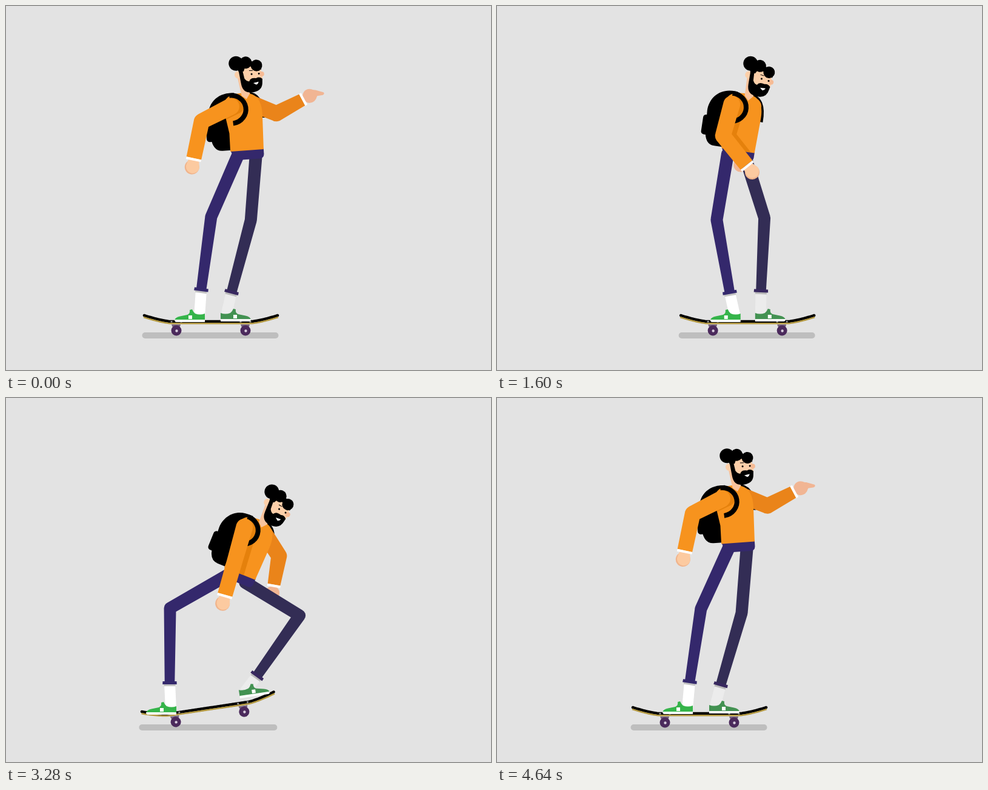
These frames come from a looping animation (800x600 px, 4.68 s). An HTML page:

```html
<!DOCTYPE html>
<html lang="en">
<head>
<meta charset="utf-8">
<title>Skater</title>
<style>
html, body { margin: 0; width: 100%; height: 100%; overflow: hidden; background: #e3e3e3; }
svg { display: block; width: 100vw; height: 100vh; }
</style>
</head>
<body>
<svg viewBox="0 0 800 600" xmlns="http://www.w3.org/2000/svg">
  <defs>
    <path id="shirt" d="M-27.5 0L-27-30L-34-72Q-33-90-15-94L-3-95L3-88L9-94L16-91Q30-83 29.500-58L27.500 0Z"/>
    <clipPath id="inShirt"><use href="#shirt"/></clipPath>
    <g id="shoe">
      <path d="M0-3V-14Q-8-11-16-14Q-19-16-21-21L-25-20Q-24-14-29-12L-41-9.500Q-49-8-50-3Z"/>
      <path d="M-50-4H0V0H-47Q-50 0-50-4Z" fill="#fff"/>
      <rect x="-27" y="-11" width="6" height="6" fill="#fff"/>
    </g>
  </defs>
  <rect width="800" height="600" fill="#e3e3e3"/>
  <rect id="shadow" y="538" height="10" rx="5" fill="#bebebe"/>

  <g id="farArm">
    <path d="M4-94C24-94 32-78 31-52" fill="none" stroke="#000" stroke-width="5"/>
    <path id="farSleeve" fill="#ea841a"/>
    <g id="farHand" fill="#f1b593">
      <path id="finger" d="M8-9L20-8.500L27-4L37 5.500Q38 9 34 9L25 6L20 10Z"/>
      <circle cx="14" r="11.500"/>
      <rect x="0" y="-11" width="4" height="22" fill="#fff"/>
    </g>
  </g>

  <g id="board" stroke-linejoin="round">
    <path id="deck" fill="#000" stroke="#000"/>
    <path id="ply" fill="#b3983f" stroke="#b3983f" stroke-width="2.500"/>
    <path id="under" fill="#107a45"/>
    <path id="bolts" fill="#9a9a9a"/>
    <path id="trucks" fill="#75627f"/>
    <path id="axles" stroke="#a7a0ab" stroke-width="4"/>
    <path id="wheels" fill="#4b2a5c"/>
    <path id="hubs" fill="#d8cedd"/>
  </g>

  <path id="farSock" fill="#ececec"/>
  <path id="farBand" fill="#b9b9b9"/>
  <g id="farShoe" fill="#439252"><use href="#shoe" transform="scale(-1 1)"/></g>
  <path id="farLeg" fill="#332d55"/>
  <path id="farCuff" fill="#38285f"/>

  <path id="nearSock" fill="#fff"/>
  <path id="nearBand" fill="#c2c2c2"/>
  <g id="nearShoe" fill="#35b44a"><use href="#shoe"/></g>
  <path id="nearLeg" fill="#34286c"/>
  <path id="nearCuff" fill="#34286c"/>

  <g id="body">
    <path d="M-27.500-2H27.500V8Q27 15 20 15H-20Z" fill="#34286c"/>
    <path d="M-18-96C-44-98-60-80-60-58L-58-25Q-56-2-40-2H-15V-96Z"/>
    <rect x="-65" y="-51" width="20" height="33" rx="5"/>
    <use href="#shirt" fill="#f7931e"/>
    <g clip-path="url(#inShirt)"><path id="armShade" fill="#e5810c" transform="translate(8 -1)"/></g>
    <ellipse cx="-21" cy="-69" rx="23" ry="24" fill="none" stroke="#000" stroke-width="8" stroke-dasharray="74 90" transform="rotate(-95 -21 -69)"/>
    <g id="head">
      <path d="M-6-36L10-20L9-2L2 6L-5-1Z" fill="#f9c39c"/>
      <path d="M-2-52H33L35-25L30-12H2Z" fill="#fccfa9"/>
      <circle cx="-4" cy="-36" r="6" fill="#fccfa9"/>
      <circle cx="34.500" cy="-30" r="4" fill="#f6bb95"/>
      <path d="M-2-50H4L5-28Q8-22 12-22Q15-28 24-25Q30-27 34-22L33-17Q31-3 16-3Q-2-3-2-20Z"/>
      <path d="M18-18L27-18.500Q25-14 22-14.500Z" fill="#fff"/>
      <circle cx="18" cy="-33" r="1.500"/>
      <circle cx="30" cy="-31.500" r="1.500"/>
      <path d="M15-39.500L21-38.500M28-37L32-36.500" stroke="#000"/>
      <circle cx="-4" cy="-55" r="12"/>
      <circle cx="12" cy="-53.500" r="10"/>
      <circle cx="28.500" cy="-45.500" r="9.500"/>
      <path d="M-2-40H6L10-47Q22-47 35-37L37-46L10-60L-4-50Z"/>
    </g>
    <path id="nearSleeve" fill="#f7931e"/>
    <g id="nearHand">
      <circle cx="15" r="12" fill="#f0b48c"/>
      <path d="M2-9L14-12A11 11 0 0 1 14 10L2 8Z" fill="#fccaa0"/>
      <rect x="0" y="-12.500" width="4" height="25" fill="#fff"/>
    </g>
  </g>
</svg>
<script>
const LOOP = 4680, STEP = 40;
const times = [0, 1120, 2000, 2520, 3280, 3880, 4240, 4640];

// One value per key time.
const boardKeys = {
  x: [338, 453, 368, 338, 334.4, 336, 334, 334],
  y: [521, 521, 521, 521, 511.7, 402, 521, 521],
  tilt: [0, 0, 0, 0, -8.5, -4.5, 0, 0],
  roll: [0, 0, 0, 0, 0, 45, 0, 0],
  shade: [112.5, 112.5, 112.5, 112.5, 114, 129.5, 114, 112.5]
};
const bodyKeys = {
  x: [397.5, 397.5, 397.5, 397.5, 385.5, 384.5, 388, 397.5],
  y: [238, 240, 237, 239.5, 289.5, 214, 275, 238.5],
  lean: [-4, 0, 14, -4, 22, 6, 12, -4],
  head: [-7, 0, 1, -9, 0, -6, 0, -7]
};
const armKeys = {
  nearUp: [153, 81, 138, 172, 106, 122, 135, 153],
  nearLow: [102, 12, 98, 135, 106, 87, 95, 102],
  farUp: [22, 115, 129, 22, 57, 60, 45, 22],
  farLow: [-28, 132, 28, -28, 100, 60, 20, -28]
};
const nearKeys = {
  x: [322, 418, 346, 322, 270, 268, 285, 318],
  y: [468, 475, 470, 468, 470, 364, 470, 468],
  bend: [15.8, 19.3, 19.9, 18.9, 58.7, 78.6, 52, 16],
  heelX: [328, 440, 358, 328, 281, 284, 291, 323],
  heelY: [521, 521, 521, 521, 522, 415, 521, 521]
};
const farKeys = {
  x: [372, 468.5, 398, 373, 414, 421, 398, 369],
  y: [472, 468, 472, 473, 458, 371, 470, 473],
  bend: [10.4, 17, 20.7, 13.5, 82, 85.8, 67, 11.6],
  heelX: [354, 465, 382, 354, 386, 391, 372, 350],
  heelY: [520, 520, 520, 520, 495, 413, 520, 520]
};

const el = {};
document.querySelectorAll('[id]').forEach(e => el[e.id] = e);
const set = (id, d) => el[id].setAttribute('d', d);
const move = (id, x, y, a) => el[id].setAttribute('transform', `translate(${x} ${y}) rotate(${a})`);
const rad = a => a * Math.PI / 180;
const polar = (p, len, a) => [p[0] + len * Math.cos(rad(a)), p[1] + len * Math.sin(rad(a))];
const spin = (x, y, a) => {
  const c = Math.cos(rad(a)), s = Math.sin(rad(a));
  return [x * c - y * s, x * s + y * c];
};
const heading = (p, q) => Math.atan2(q[1] - p[1], q[0] - p[0]) * 180 / Math.PI;

// Monotone cubic through the keys, wrapping around the loop.
function sample(v, t) {
  const n = times.length;
  const span = i => i === n - 1 ? LOOP - times[i] : times[i + 1] - times[i];
  const rise = i => (v[(i + 1) % n] - v[i]) / span(i);
  const slope = i => {
    const j = (i + n - 1) % n, a = rise(j), b = rise(i);
    if (a * b <= 0) return 0;
    const w = 2 * span(i) + span(j), u = span(i) + 2 * span(j);
    return (w + u) / (w / a + u / b);
  };
  let i = n - 1;
  while (times[i] > t) i--;
  const k = (i + 1) % n, h = span(i), s = (t - times[i]) / h, r = 1 - s;
  return v[i] * (1 + 2 * s) * r * r + v[k] * s * s * (3 - 2 * s)
    + h * (slope(i) * s * r * r - slope(k) * s * s * r);
}
function pose(keys, t) {
  const o = {};
  for (const k in keys) o[k] = sample(keys[k], t);
  return o;
}

const dot = (x, y, r, ry = r) => `M${x + r} ${y}A${r} ${ry} 0 0 0 ${x - r} ${y}A${r} ${ry} 0 0 0 ${x + r} ${y}Z`;
function limb(p, q, w1, w2) {
  const dx = q[0] - p[0], dy = q[1] - p[1], d = Math.hypot(dx, dy) || 1;
  const nx = -dy / d / 2, ny = dx / d / 2;
  return `M${p[0] + nx * w1} ${p[1] + ny * w1}L${q[0] + nx * w2} ${q[1] + ny * w2}`
    + `L${q[0] - nx * w2} ${q[1] - ny * w2}L${p[0] - nx * w1} ${p[1] - ny * w1}Z`;
}
const chain = (p, q, r, w) => limb(p, q, w[0], w[1]) + limb(q, r, w[1], w[2])
  + dot(...p, w[0] / 2) + dot(...q, w[1] / 2);

function drawArm(name, shoulder, up, low, lens, widths) {
  const elbow = polar(shoulder, lens[0], up), wrist = polar(elbow, lens[1], low);
  const d = chain(shoulder, elbow, wrist, widths);
  set(name + 'Sleeve', d);
  move(name + 'Hand', ...wrist, low);
  return d;
}

function drawLeg(name, hip, k, side, thigh, shin, angle) {
  const foot = [k.x, k.y], dx = k.x - hip[0], dy = k.y - hip[1], d = Math.hypot(dx, dy);
  const along = (thigh * thigh - shin * shin + d * d) / (2 * d), b = k.bend * side;
  const knee = [hip[0] + (dx * along + dy * b) / d, hip[1] + (dy * along - dx * b) / d];
  const a = heading(knee, foot);
  set(name + 'Leg', chain(hip, knee, foot, [21, 20, 16.5]));
  set(name + 'Cuff', limb(polar(foot, -3, a), polar(foot, 2, a), 23, 23.5));
  const [ox, oy] = spin(side * 9, -9, angle);
  const heel = [k.heelX + ox, k.heelY + oy];
  set(name + 'Sock', limb(foot, heel, 18, 18));
  set(name + 'Band', limb(foot, polar(foot, 5, a), 19, 19));
  move(name + 'Shoe', k.heelX, k.heelY, angle);
}

function drawBoard(b) {
  const c = Math.cos(rad(b.roll)), s = Math.sin(rad(b.roll));
  const lift = x => -10 * Math.pow(Math.max(0, (Math.abs(x) - 66) / 44), 1.4);
  const half = x => 25 * Math.sqrt(Math.max(0, 1 - Math.max(0, (Math.abs(x) - 85) / 25) ** 2));
  const outline = off => {
    const top = [], low = [];
    for (let x = -110; x <= 110; x += 2.5) {
      const y = lift(x) * c + off * c, w = half(x) * s;
      top.push(`${x} ${y - w}`);
      low.unshift(`${x} ${y + w}`);
    }
    return 'M' + top.concat(low).join('L') + 'Z';
  };
  move('board', b.x, b.y, b.tilt);
  set('deck', outline(-1));
  el.deck.setAttribute('stroke-width', 4.5 * c);
  set('ply', outline(2.3));
  set('under', outline(3.5));
  let bolts = '', trucks = '', axles = '', wheels = '', hubs = '';
  for (const x of [-57, 57]) {
    const y = 14 * c, w = 20 * s;
    for (const e of [-8, 8]) bolts += `M${x + e - 1.5} ${-2 * c}h3v${2.5 * c}h-3Z`;
    trucks += `M${x - 8} ${4 * c}L${x + 7} ${4 * c}L${x + 4} ${y}H${x - 4}Z`;
    axles += `M${x} ${y - w}V${y + w}`;
    for (const z of [-w, w]) {
      wheels += dot(x, y + z, 8.5, 8.5 - 1.5 * s);
      hubs += dot(x + 0.5, y + z + 0.5, 2.2 * c * c);
    }
  }
  set('bolts', bolts);
  set('trucks', trucks);
  set('axles', axles);
  set('wheels', wheels);
  set('hubs', hubs);
  el.shadow.setAttribute('x', b.x - 1 - b.shade);
  el.shadow.setAttribute('width', b.shade * 2);
}

function draw(t) {
  const board = pose(boardKeys, t), body = pose(bodyKeys, t), arm = pose(armKeys, t);
  const lean = body.lean, flip = board.roll / 45;
  const joint = (x, y) => {
    const p = spin(x, y, lean);
    return [body.x + p[0], body.y + p[1]];
  };
  drawBoard(board);
  drawLeg('far', joint(14, 10), pose(farKeys, t), 1, 105, 122, board.tilt * (1 - flip));
  drawLeg('near', joint(-16, 8), pose(nearKeys, t), -1, 110, 122, -8 * flip);
  move('body', body.x, body.y, lean);
  move('farArm', body.x, body.y, lean);
  move('head', 2.5, -90, body.head);
  drawArm('far', [14, -76], arm.farUp - lean, arm.farLow - lean, [43, 48], [27, 26, 21]);
  const d = drawArm('near', [-21.5, -74], arm.nearUp - lean, arm.nearLow - lean, [54, 62], [28, 26, 25]);
  set('armShade', d);
  el.finger.style.display = t < 400 || t >= 4400 ? '' : 'none';
}

let start;
function tick(now) {
  if (start === undefined) start = now;
  const t = (now - start) % LOOP;
  draw(t - t % STEP);
  requestAnimationFrame(tick);
}
draw(0);
requestAnimationFrame(tick);
</script>
</body>
</html>
```
